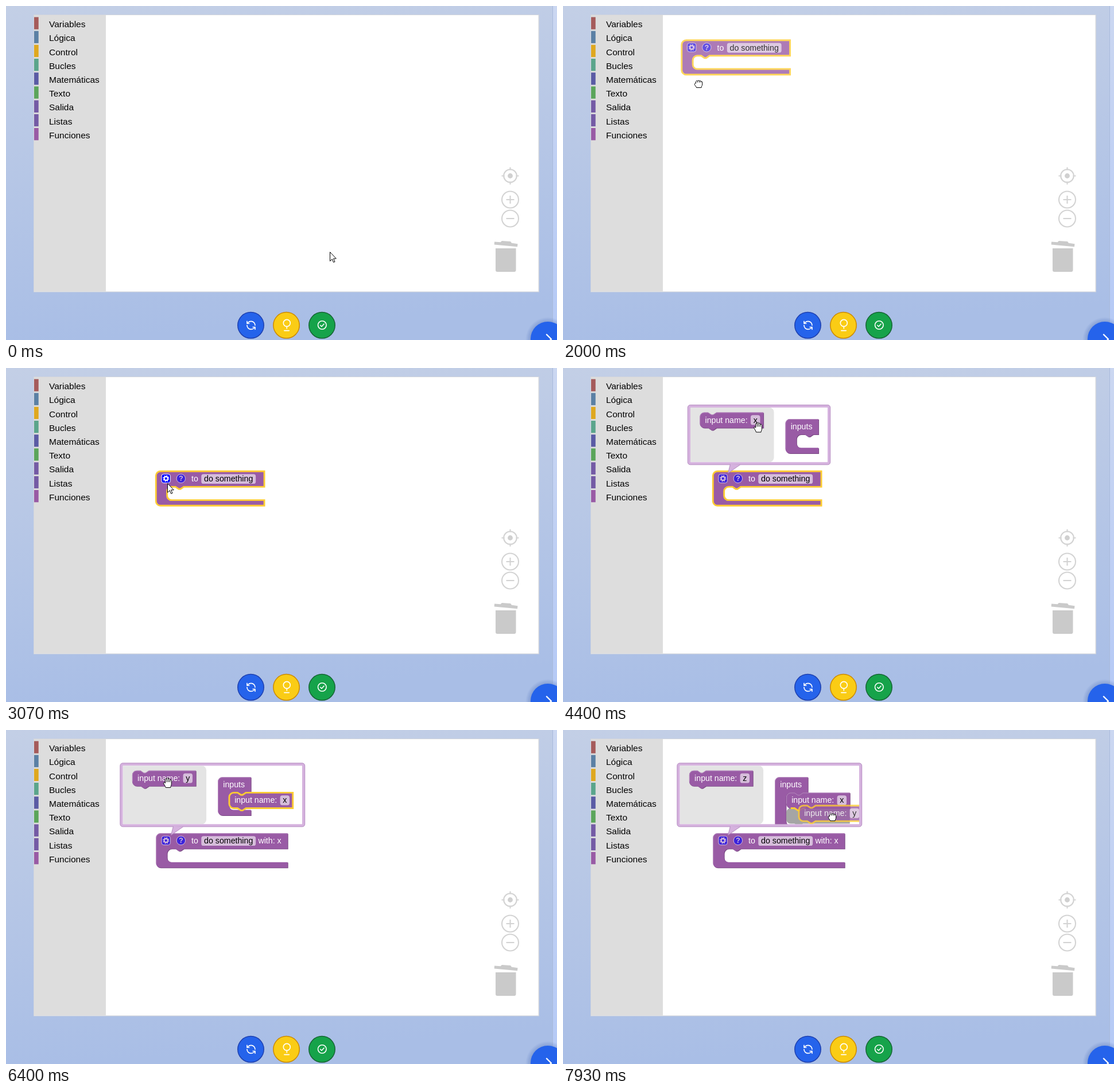
Recreate the animation shown at these times as an HTML page. Size 960x583 px, loop 8000 ms.

```html
<!DOCTYPE html>
<html lang="es">
<head>
<meta charset="utf-8">
<title>Editor de bloques</title>
<style>
html, body { margin: 0; width: 100%; height: 100%; overflow: hidden; background: #b5c5e5; }
svg { display: block; width: 100vw; height: 100vh; }
text { font-family: "Liberation Sans", Arial, sans-serif; user-select: none; }
.menu { font-size: 15.5px; }
.label, .field { font-size: 14.667px; fill: #fff; }
.field { fill: #000; }
.body { fill: #995ba5; }
.dark { fill: #7a4984; }
.light { fill: none; stroke: #b88cc0; stroke-width: 1; }
.sel .body { stroke: #fc3; stroke-width: 3; }
.sel .dark, .sel .light { display: none; }
.box { fill: #fff; fill-opacity: .6; }
.icon { opacity: .6; }
.icon.hot { opacity: 1; }
.tool { fill: none; stroke: #d3d3d3; stroke-width: 2.1; }
.line { fill: none; stroke: #fff; stroke-linecap: round; stroke-linejoin: round; }
.cursor path { fill: #fff; stroke: #000; stroke-width: 1; stroke-linejoin: round; }
</style>
</head>
<body>
<svg id="stage" viewBox="0 0 960 583">
  <defs>
    <linearGradient id="sky" x1="0" y1="0" x2=".12" y2="1">
      <stop offset="0" stop-color="#c3cfe6"/><stop offset="1" stop-color="#a9bee6"/>
    </linearGradient>
    <linearGradient id="strip" x1="0" y1="0" x2="0" y2="1">
      <stop offset="0" stop-color="#cbd7f1"/><stop offset="1" stop-color="#b4c9f6"/>
    </linearGradient>
    <radialGradient id="halo">
      <stop offset=".72" stop-color="#3b5fb0" stop-opacity=".4"/><stop offset="1" stop-color="#3b5fb0" stop-opacity="0"/>
    </radialGradient>
    <clipPath id="clip"><rect id="clipBox"/></clipPath>
    <clipPath id="area"><rect x="49" y="16" width="878" height="482"/></clipPath>
  </defs>
  <rect width="960" height="583" fill="url(#sky)"/>
  <rect x="953" width="7" height="583" fill="url(#strip)"/>
  <path d="M952.5 0V583" stroke="#a9badb"/>
  <rect x="48" y="15" width="881" height="484.5" fill="#d3d6dc"/>
  <rect x="49" y="16" width="878.5" height="482.3" fill="#fff"/>
  <rect x="49" y="16" width="125" height="482.3" fill="#ddd"/>
  <g id="menu"></g>

  <g class="tool">
    <circle cx="878.5" cy="296.5" r="11.3"/>
    <path d="M878.5 281.5v5M878.5 306.500v5M863.500 296.500h5M888.500 296.500h5"/>
    <circle cx="878.5" cy="296.5" r="4.400" fill="#d0d0d0" stroke="none"/>
    <circle cx="878.500" cy="338" r="14.500"/><path d="M871.500 338h14M878.500 331v14"/>
    <circle cx="878.500" cy="371" r="14.500"/><path d="M871.500 371h14"/>
  </g>
  <g fill="#cacaca">
    <path d="M853 423H888.500V461a3 3 0 0 1-3 3H856a3 3 0 0 1-3-3Z"/>
    <path d="M851 411.500L861.500 412.300 864 410 879 411 881 413.800 891.500 415.200 891 420.300 850.700 416.500Z"/>
  </g>

  <g stroke-width="1.5">
    <circle cx="426.500" cy="557.300" r="22.700" fill="#2563eb" stroke="#1e40af"/>
    <circle cx="488.500" cy="557.300" r="22.700" fill="#facc15" stroke="#ca8a04"/>
    <circle cx="550.500" cy="557.300" r="22.700" fill="#16a34a" stroke="#166534"/>
  </g>
  <g class="line" stroke-width="1.6">
    <path transform="translate(417.600 548) scale(.78)" stroke-width="2.100" d="M21 12a9 9 0 0 0-9-9 9.750 9.750 0 0 0-6.740 2.740L3 8M3 3v5h5M3 12a9 9 0 0 0 9 9 9.750 9.750 0 0 0 6.740-2.740L21 16M16 16h5v5"/>
    <circle cx="489.300" cy="553.400" r="6"/>
    <path d="M489.300 559.500V563M484.800 566.600h8.500"/>
    <circle cx="550.800" cy="557" r="7.300"/>
    <path d="M547.700 557.300l2.200 2.200 4.200-4.500"/>
  </g>
  <circle cx="944" cy="582" r="39" fill="url(#halo)"/>
  <circle cx="944" cy="581" r="30" fill="#2563eb"/>
  <path class="line" stroke-width="2.400" d="M942 573.500l8 8-8 8"/>

  <g id="work" clip-path="url(#area)"></g>
  <g id="pointer"></g>
</svg>
<script>
const SCALE = 0.968, LOOP = 8000, STEP = 200 / 3;
const $ = id => document.getElementById(id);

function el(parent, tag, attrs = {}, text) {
  const node = document.createElementNS('http://www.w3.org/2000/svg', tag);
  set(node, attrs);
  if (text) node.textContent = text;
  parent.appendChild(node);
  return node;
}
function set(node, attrs) {
  for (const key in attrs) node.setAttribute(key, attrs[key]);
}
const show = (node, on) => node.style.display = on ? '' : 'none';
const place = (node, x, y) =>
  node.setAttribute('transform', `translate(${x.toFixed(2)} ${y.toFixed(2)}) scale(${SCALE})`);

// Block outlines
const top8 = 'M0 8A8 8 0 0 1 8 0';
const notch = 'H15l6 4h3l6-4';
const end8 = 'H8a8 8 0 0 1-8-8Z';
const mouth = (w, inner) =>
  `V28H50l-6 4h-3l-6-4H28a8 8 0 0 0-8 8v${inner - 16}a8 8 0 0 0 8 8H${w}`;
const cShape = (w, inner) => `${top8}H${w}${mouth(w, inner)}v10${end8}`;
const bar = (w, h) => `${top8}${notch}H${w}V${h}H30l-6 4h-3l-6-4${end8}`;
const tab = 'v5c0 10-8-8-8 7.5s8-2.500 8 7.500';

function block(parent, shape, w, h, notched) {
  const g = el(parent, 'g');
  el(g, 'path', { class: 'dark', d: shape, transform: 'translate(1 1)' });
  el(g, 'path', { class: 'body', d: shape });
  el(g, 'path', { class: 'light', d: `M.5 ${h - 8}V8A7.500 7.500 0 0 1 8 .5${notched ? 'H15l6 4h3l6-4' : ''}H${w}` });
  return g;
}
function reshape(g, shape, w, h) {
  g.children[0].setAttribute('d', shape);
  g.children[1].setAttribute('d', shape);
  g.children[2].setAttribute('d', `M.5 ${h - 8}V8A7.500 7.500 0 0 1 8 .5H${w}`);
}
const label = (g, x, text, y = 18.700) => el(g, 'text', { class: 'label', x, y }, text);
function field(g, x, w, text) {
  el(g, 'rect', { class: 'box', x, y: 5, width: w, height: 17.500, rx: 4 });
  return el(g, 'text', { class: 'field', x: x + w / 2, y: 18.700, 'text-anchor': 'middle' }, text);
}
function procHead(g) {
  const gear = el(g, 'g', { class: 'icon' });
  el(gear, 'rect', { x: 10, y: 5, width: 16, height: 16, rx: 4, fill: '#00f', stroke: '#fff' });
  el(gear, 'circle', { cx: 18, cy: 13, r: 3.200, fill: 'none', stroke: '#fff', 'stroke-width': 2 });
  el(gear, 'circle', { cx: 18, cy: 13, r: 4.900, fill: 'none', stroke: '#fff', 'stroke-width': 1.700, 'stroke-dasharray': '2 1.848' });
  const help = el(g, 'g', { class: 'icon' });
  el(help, 'circle', { cx: 45, cy: 13, r: 8, fill: '#00f', stroke: '#fff' });
  el(help, 'text', { x: 45, y: 17.500, 'text-anchor': 'middle', fill: '#fff', 'font-size': 12.500, 'font-weight': 700 }, '?');
  label(g, 63.700, 'to');
  field(g, 81.600, 98, 'do something');
  return gear;
}
function inputBlock(parent, name) {
  const g = block(parent, bar(114.500, 28), 114.500, 28, true);
  label(g, 9.500, 'input name:');
  g.name = field(g, 91.600, 17, name);
  return g;
}

// Toolbox
const rows = [['Variables', '#a55b5b'], ['Lógica', '#5b80a5'], ['Control', '#dfa81f'],
  ['Bucles', '#5ba58c'], ['Matemáticas', '#5b5ba5'], ['Texto', '#5ba55b'],
  ['Salida', '#745ba5'], ['Listas', '#745ba5'], ['Funciones', '#995ba5']];
const rowMark = el($('menu'), 'rect', { x: 56.500, y: 213, width: 117.500, height: 21.300, fill: '#995ba5' });
const rowText = rows.map(([name, color], i) => {
  const y = 19.400 + i * 24.200;
  el($('menu'), 'rect', { x: 49, y, width: 7.700, height: 21.300, fill: color });
  return el($('menu'), 'text', { class: 'menu', x: 75, y: y + 17.800 }, name);
})[8];

// Flyout with two further blocks
const work = $('work');
const flyout = el(work, 'g');
el(flyout, 'path', { d: 'M174 16H375a8 8 0 0 1 8 8V490a8 8 0 0 1-8 8H174Z', fill: '#e4e4e4' });
const withReturn = block(flyout, `${top8}H195${mouth(195, 24)}${tab}v8${end8}`, 195, 80);
procHead(withReturn);
label(withReturn, 142, 'return', 70.500);
place(withReturn, 189.500, 107);
const ifReturn = block(flyout, bar(150, 34), 150, 34, true);
label(ifReturn, 9.500, 'if', 22);
label(ifReturn, 66, 'return', 22);
for (const x of [34, 120]) {
  el(ifReturn, 'path', { d: `M${x} 5h22v24h-22v-4c0-10-8 8-8-7.500s8 2.500 8-7.500Z`, fill: '#e4e4e4' });
}
place(ifReturn, 189.500, 212);

// Procedure block
const proc = block(work, cShape(195, 24), 195, 62);
const gear = procHead(proc);
const withX = label(proc, 184, 'with: x');

// Mutator bubble
const bubble = el(work, 'g');
const frame = el(bubble, 'rect', { rx: 4.500, fill: '#d5b2de', stroke: '#b48bc0' });
el(bubble, 'path', { d: 'M291.500 168L287.500 183.500 308.500 169', fill: '#d5b2de', stroke: '#b48bc0' });
el(bubble, 'path', { d: 'M291.500 165.500H308V168.200H291.500Z', fill: '#d5b2de' });
const sheet = el(bubble, 'rect', { fill: '#fff' });
const inside = el(bubble, 'g', { 'clip-path': 'url(#clip)' });
const tray = el(inside, 'path', { fill: '#e4e4e4' });
const spare = inputBlock(inside, 'x');
const inputs = block(inside, cShape(59.500, 24), 59.500, 62);
label(inputs, 9.500, 'inputs');
const ghost = el(inside, 'path', { d: bar(114.500, 28), fill: '#a5a5a5' });
const inX = inputBlock(inside, 'x');
const joint = el(inside, 'path', { d: 'M8 0h7l6 4h3l6-4h5', fill: 'none', stroke: '#fc3', 'stroke-width': 3 });
const inY = inputBlock(inside, 'y');

// Cursors
const shapes = {
  arrow: ['M.5.5V16.300L4.200 12.800 6.600 18.400 9 17.400 6.600 11.900H11.300Z'],
  open: ['M-3.500 8.500C-4 6-6.500 3-7.200 1C-7.600-.8-5.600-1.300-4.300.8V-5.500C-4.400-7.500-2-7.500-1.800-5.500V-7C-1.600-9 .9-9 1-7V-5.800C1.200-7.800 3.600-7.600 3.700-5.600V-4C4-5.800 6.400-5.600 6.500-3.800V2.500C6.500 5 5 6 5 8.500Z',
    'M-1.700-5.500V-1M1-5.800V-1M3.700-4V-1'],
  fist: ['M-6.500 1.500C-7-1-5-2-4.500-1V-3.500C-4.500-6-1.800-6-1.600-4.600C-1.200-6.600 1.200-6.400 1.500-4.800C2-6.200 4-6 4.200-4C5-5 6.700-4.500 6.700-3V1C6.700 3 5 4 5 6.500H-3.500C-3.500 4.500-6 3.500-6.500 1.500Z',
    'M-1.600-4.500V-2.500M1.500-4.700V-2.500M4.200-4V-2.500']
};
const cursors = {};
for (const kind in shapes) {
  cursors[kind] = el($('pointer'), 'g', { class: 'cursor' });
  shapes[kind].forEach(d => el(cursors[kind], 'path', { d }));
}
const kinds = [[0, 'arrow'], [1200, 'open'], [1800, 'fist'], [2530, 'open'], [3000, 'arrow'],
  [4200, 'open'], [4670, 'fist'], [5670, 'open'], [5930, 'arrow'], [6270, 'open'], [6530, 'fist']];

// Cursor path: time, x, y; a trailing 1 eases into that point
const path = [
  [0, 564, 429], [30, 564, 429], [600, 136, 232, 1], [800, 136, 232], [1470, 205.500, 70, 1],
  [1800, 205.500, 70], [1870, 210, 81], [1930, 222.800, 105.700], [2000, 236, 136], [2130, 264, 194],
  [2200, 277, 213], [2270, 285, 223], [2330, 284, 226], [2470, 277, 226.500, 1], [2670, 277, 226.500],
  [3070, 281, 201, 1], [3330, 281, 201], [3400, 280, 199], [3470, 282.500, 196], [3800, 282.500, 196],
  [4330, 346, 103, 1], [4400, 340, 103.500], [4600, 299.300, 98.500, 1], [4630, 299.300, 98.500],
  [5330, 450, 137.500, 1], [5670, 450, 137.500], [6470, 278, 91, 1], [6530, 279, 91],
  [7070, 352, 113, 1], [7130, 375, 124.500], [7200, 403, 140], [7270, 427, 151], [7330, 450, 153],
  [7400, 464, 153], [7530, 471, 152], [7800, 471, 152], [7870, 469, 152]
];
function cursorAt(t) {
  if (t <= 0) return [path[0][1], path[0][2]];
  const i = path.findIndex(p => p[0] > t);
  if (i < 0) return path[path.length - 1].slice(1, 3);
  const a = path[i - 1], b = path[i];
  let u = (t - a[0]) / (b[0] - a[0]);
  if (b[3]) u = u * u * (3 - 2 * u);
  return [a[1] + (b[1] - a[1]) * u, a[2] + (b[2] - a[2]) * u];
}

const tickTime = k => Math.round(k * STEP / 10) * 10;

function draw(ms) {
  const k = Math.floor((ms + 5) / STEP), t = tickTime(k);
  const within = (a, b) => t >= a && t < b;
  const [cx, cy] = cursorAt(t);
  const [hx, hy] = cursorAt(tickTime(k - 1)); // dragged blocks trail by one tick

  const kind = kinds.filter(c => c[0] <= t).pop()[1];
  for (const name in cursors) show(cursors[name], name === kind);
  cursors[kind].setAttribute('transform', `translate(${cx.toFixed(2)} ${cy.toFixed(2)})`);

  const menuOpen = within(670, 1870);
  show(rowMark, menuOpen);
  rowText.setAttribute('fill', menuOpen ? '#fff' : '#000');
  show(flyout, menuOpen);

  show(proc, t >= 670);
  if (t < 1800) place(proc, 189.500, 23.700);
  else if (t < 2530) place(proc, hx - 16, hy - 46);
  else place(proc, 261.300, 180.300);
  proc.setAttribute('opacity', within(1870, 2530) ? .8 : 1);
  proc.classList.toggle('sel', within(1530, 4670));
  gear.classList.toggle('hot', within(3000, 3870));

  const joined = t >= 5730, w = joined ? 237 : 195;
  reshape(proc, cShape(w, 24), w, 62);
  show(withX, joined);

  show(bubble, t >= 3800);
  if (t < 3800) return;
  const x = joined ? 203.600 : 222, y = joined ? 62.300 : 69;
  const bw = joined ? 312.400 : 239, bh = 164.300 - y;
  set(frame, { x: x - 4.700, y: y - 4.500, width: bw + 9.400, height: bh + 9 });
  set(sheet, { x, y, width: bw, height: bh });
  set($('clipBox'), { x, y, width: bw, height: bh });
  set(tray, { d: `M${x} ${y}h137.500a8 8 0 0 1 8 8v${bh - 16}a8 8 0 0 1-8 8h-137.500Z` });

  place(spare, x + 16.300, y + 8.500);
  spare.name.textContent = t < 4670 ? 'x' : t < 6530 ? 'y' : 'z';

  const ix = x + 165.500, iy = y + 20, slotX = ix + 20.500 * SCALE, slotY = iy + 28 * SCALE;
  const first = within(5130, 5730), second = t >= 7270;
  const inner = second ? 59 : t >= 5130 ? 31 : 24;
  reshape(inputs, cShape(59.500, inner), 59.500, inner + 38);
  place(inputs, ix, iy);

  show(ghost, first || second);
  show(joint, first || second);
  const dropY = slotY + (second ? 28 * SCALE : 0);
  place(ghost, slotX, dropY);
  place(joint, slotX, dropY);

  show(inX, t >= 4670);
  if (joined) place(inX, slotX, slotY);
  else place(inX, hx - 61, hy - 21);
  inX.classList.toggle('sel', within(4670, 6530));
  inX.setAttribute('opacity', joined ? 1 : .8);

  show(inY, t >= 6530);
  place(inY, hx - 58, hy - 20);
  inY.classList.add('sel');
  inY.setAttribute('opacity', .8);
}

const start = performance.now();
function tick() {
  draw((performance.now() - start) % LOOP);
  requestAnimationFrame(tick);
}
tick();
</script>
</body>
</html>
```
